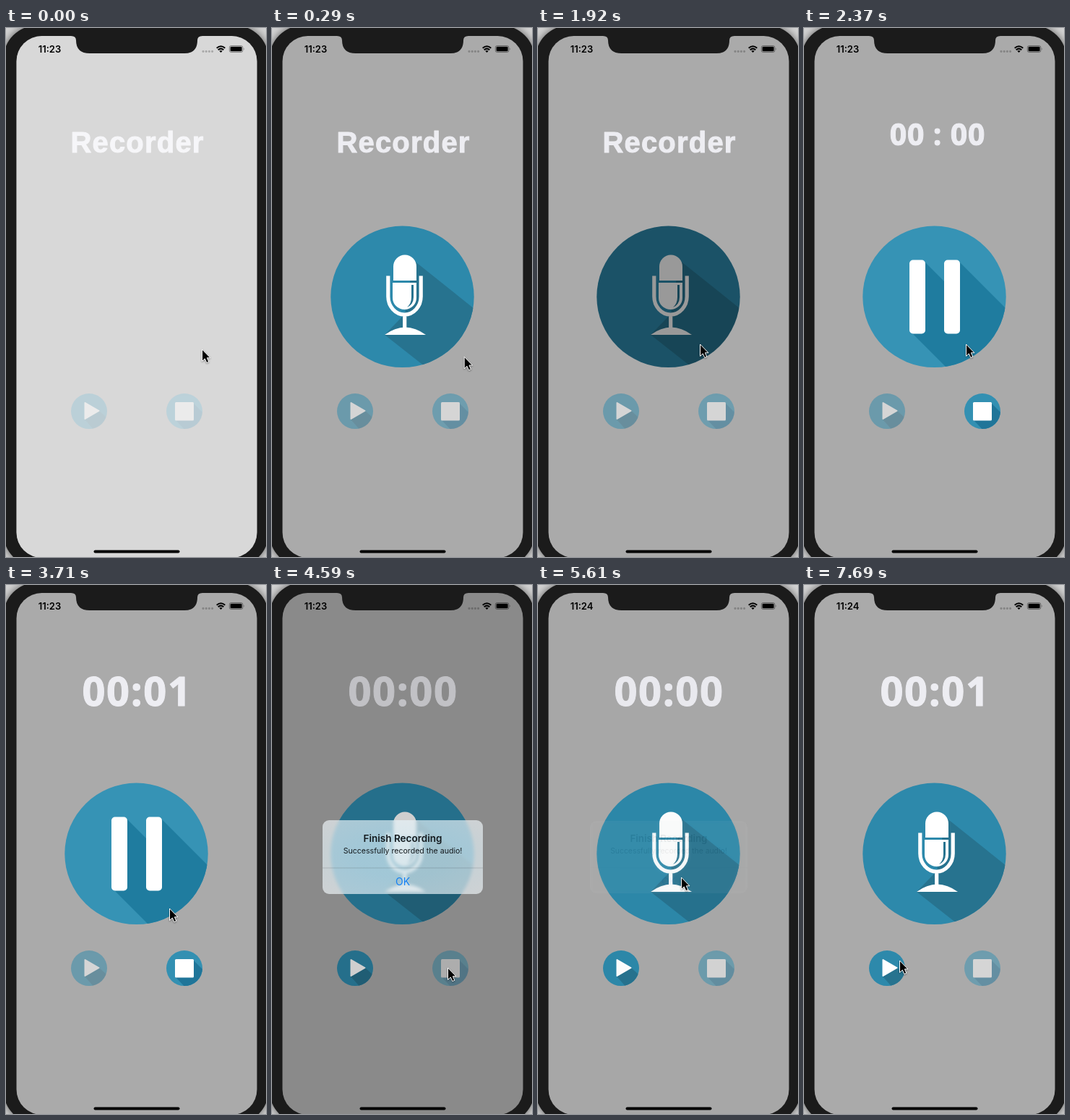
These frames come from a looping animation (360x731 px, 8000 ms). An HTML page:

```html
<!DOCTYPE html>
<html lang="en">
<head>
<meta charset="utf-8">
<title>Recorder</title>
<style>
html, body { margin: 0; width: 100%; height: 100%; overflow: hidden; background: #d4d4d4; }
svg { display: block; }
#stage, #pointer { position: absolute; left: 0; top: 0; width: 360px; height: 731px; }
.title { fill: #ededf2; stroke: #ededf2; stroke-width: 1; stroke-linejoin: round; font-weight: 700; text-anchor: middle; }
.name { font: 700 40px "Liberation Sans", Arial, sans-serif; letter-spacing: 1.2px; }
.small { font: 700 41px "Noto Sans", "Open Sans", sans-serif; letter-spacing: .8px; }
.big { font: 700 56px "Noto Sans", "Open Sans", sans-serif; letter-spacing: 1.6px; }
.ui { font-family: Inter, Roboto, sans-serif; text-anchor: middle; }
#alert {
  position: absolute; left: 70px; top: 324.5px; width: 222px; height: 102px;
  border-radius: 9px; overflow: hidden; backdrop-filter: blur(2px);
  background: radial-gradient(ellipse, rgba(222,242,250,.68) 40%, rgba(240,245,248,.68));
}
</style>
</head>
<body>
<svg id="stage" viewBox="0 0 360 731">
  <defs>
    <clipPath id="disc"><ellipse cx="180.5" cy="371.3" rx="99.2" ry="97.8"/></clipPath>
    <clipPath id="playDisc"><ellipse cx="115" cy="529.6" rx="25" ry="24.5"/></clipPath>
    <clipPath id="stopDisc"><ellipse cx="247" cy="529.6" rx="25" ry="24.5"/></clipPath>
    <rect id="screen" x="14.5" y="11" width="333" height="721" rx="35"/>
  </defs>
  <rect x="-4" y="-4" width="368" height="749" rx="48" fill="#1b1b1b" style="filter:drop-shadow(0 0 6px #0009)"/>
  <use href="#screen" fill="#aaa"/>
  <text id="title" class="title"></text>

  <g id="mic" clip-path="url(#disc)">
    <path d="M80 270H281V471H80Z" fill="#2d89ab"/>
    <path d="M196 321L290 396V486H235L156 424L184 395Z" fill="#27738f"/>
    <path d="M168 349V330a16 16.5 0 0 1 32 0V349ZM167 352H200V373a16.5 16 0 0 1-33 0Z" fill="#fff"/>
    <path d="M196 355V372q0 10-9 14q6-5 6-14V355Z" fill="#27738f"/>
    <path d="M160.8 342.5V371a22.7 25 0 0 0 45.4 0V342.5M183.7 396V416" fill="none" stroke="#fff" stroke-width="5.2"/>
    <path d="M156 424Q184.5 403 213 424Z" fill="#fff"/>
  </g>

  <g id="pause" clip-path="url(#disc)">
    <path d="M80 270H282V471H80Z" fill="#3693b5"/>
    <path d="M166 322L300 456V572L148 420ZM214 322L334 442V560L196 422Z" fill="#1f7c9f"/>
    <rect x="146" y="320.5" width="22" height="102" rx="5" fill="#fff"/>
    <rect x="194" y="320.5" width="22" height="102" rx="5" fill="#fff"/>
  </g>

  <g id="play" clip-path="url(#playDisc)">
    <path d="M89 504H141V556H89Z" fill="#2d89ab"/>
    <path d="M129 529L145 543V560H126L109 541Z" fill="#27738f"/>
    <path d="M109.5 518L128.500 529L109.5 540Z" fill="#fff" stroke="#fff" stroke-width="2" stroke-linejoin="round"/>
  </g>

  <g id="stop" clip-path="url(#stopDisc)">
    <path d="M221 504H273V556H221Z" fill="#3390b2"/>
    <path d="M259 518L275 534V560H252L235 542Z" fill="#1f7599"/>
    <rect x="234" y="517" width="26" height="25.500" rx="1.5" fill="#fff"/>
  </g>

  <use id="veil" href="#screen" fill="#fff"/>
  <use id="dim" href="#screen"/>
  <path d="M90 10V11Q97 11 97 17Q97 35 116 35H247Q265 35 265 17Q265 11 272 11V10Z" fill="#1b1b1b"/>
  <text id="clock" class="ui" x="60.5" y="34" font-size="13" font-weight="600"></text>
  <path d="M273 32.300h13" stroke="#000" stroke-opacity=".22" stroke-width="3.2" stroke-linecap="round" stroke-dasharray="0 4.200"/>
  <g fill="none" stroke="#000" stroke-width="2">
    <path d="M291.700 27.800q5.800-5.200 11.600 0M293.700 30.300q3.800-3.300 7.600 0"/>
    <path d="M295.300 31.700q2.200-1.600 4.400 0l-2.200 2.400Z" fill="#000" stroke="none"/>
  </g>
  <rect x="309.300" y="24.500" width="18.600" height="9" rx="2.500" fill="none" stroke="#000" stroke-opacity=".4"/>
  <rect x="310.600" y="25.800" width="16" height="6.400" rx="1.300"/>
  <path d="M329 27.500q1.500 1.500 0 3Z" opacity=".45"/>
  <rect x="121.500" y="721.500" width="119" height="4" rx="2"/>
</svg>

<div id="alert">
  <svg class="ui" width="222" height="102" viewBox="70 324.5 222 102">
    <text x="181" y="354" font-size="13.5" font-weight="600" fill="#141a1e">Finish Recording</text>
    <text x="181" y="370.500" font-size="10.6" fill="#141a1e">Successfully recorded the audio!</text>
    <path d="M70 390.500H292" stroke="#000" stroke-opacity=".18" stroke-width=".8"/>
    <text x="181" y="414" font-size="14" fill="#1480f5">OK</text>
  </svg>
</div>

<svg id="pointer" viewBox="0 0 360 731">
  <path id="arrow" d="M.5 0V16.500L4.300 13L6.800 18.600L9.800 17.300L7.400 11.800H12Z" stroke="#fff" stroke-linejoin="round" style="filter:drop-shadow(0 1px 1px #0006)"/>
</svg>

<script>
const $ = id => document.getElementById(id);
const LOOP = 8000, TICK = 147.8;

// [tick, values...]: linear between stops
const pointerPath = [
  [0, 271, 444], [6, 255, 475], [8, 236, 459], [10, 224, 437], [24, 224, 437],
  [25, 226, 447], [28, 243, 529], [31, 243, 529], [35, 198, 404], [38, 198, 404],
  [40, 155, 503], [42, 132, 519]
];
const veilPath = [[0, .54], [1, .2], [2, 0]];
const alertPath = [[28, 0], [29, .4], [30, .85], [31, 1], [36, 1], [37, .5], [38, .08], [39, 0]];

function at(path, k) {
  const i = path.findIndex(p => p[0] > k);
  if (i < 0) return path[path.length - 1].slice(1);
  if (i === 0) return path[0].slice(1);
  const a = path[i - 1], b = path[i], u = (k - a[0]) / (b[0] - a[0]);
  return a.slice(1).map((v, j) => v + (b[j + 1] - v) * u);
}

function setTitle(text, style, x, y) {
  const el = $('title');
  el.textContent = text;
  el.setAttribute('class', 'title ' + style);
  el.setAttribute('x', x);
  el.setAttribute('y', y);
}

function draw(k) {
  const recording = k >= 14 && k < 28;
  if (k < 14) setTitle('Recorder', 'name', 182, 172);
  else if (k < 20) setTitle('00 : 00', 'small', 185, 162);
  else setTitle(k < 28 || k >= 52 ? '00:01' : '00:00', 'big', 181.5, 167);

  $('mic').style.display = k > 0 && !recording ? '' : 'none';
  $('pause').style.display = recording ? '' : 'none';
  $('play').style.opacity = k >= 28 ? 1 : .5;
  $('stop').style.opacity = recording ? 1 : .5;

  const press = (id, on) => $(id).style.filter = on ? 'brightness(.6)' : 'none';
  press('mic', k === 13);
  press('play', k === 44);

  const [shown] = at(alertPath, k);
  const scale = k < 33 ? 1.1 - .1 * shown : .98 + .02 * shown;
  $('alert').style.opacity = shown;
  $('alert').style.transform = `scale(${scale})`;
  $('dim').style.opacity = .19 * shown;
  $('veil').style.opacity = at(veilPath, k)[0];
  $('clock').textContent = k < 34 ? '11:23' : '11:24';

  const [x, y] = at(pointerPath, k);
  $('arrow').setAttribute('transform', `translate(${x} ${y})`);
}

let last = -1;
function loop() {
  const k = Math.floor((performance.now() % LOOP + 15) / TICK);
  if (k !== last) draw(last = k);
  requestAnimationFrame(loop);
}
loop();
</script>
</body>
</html>
```
